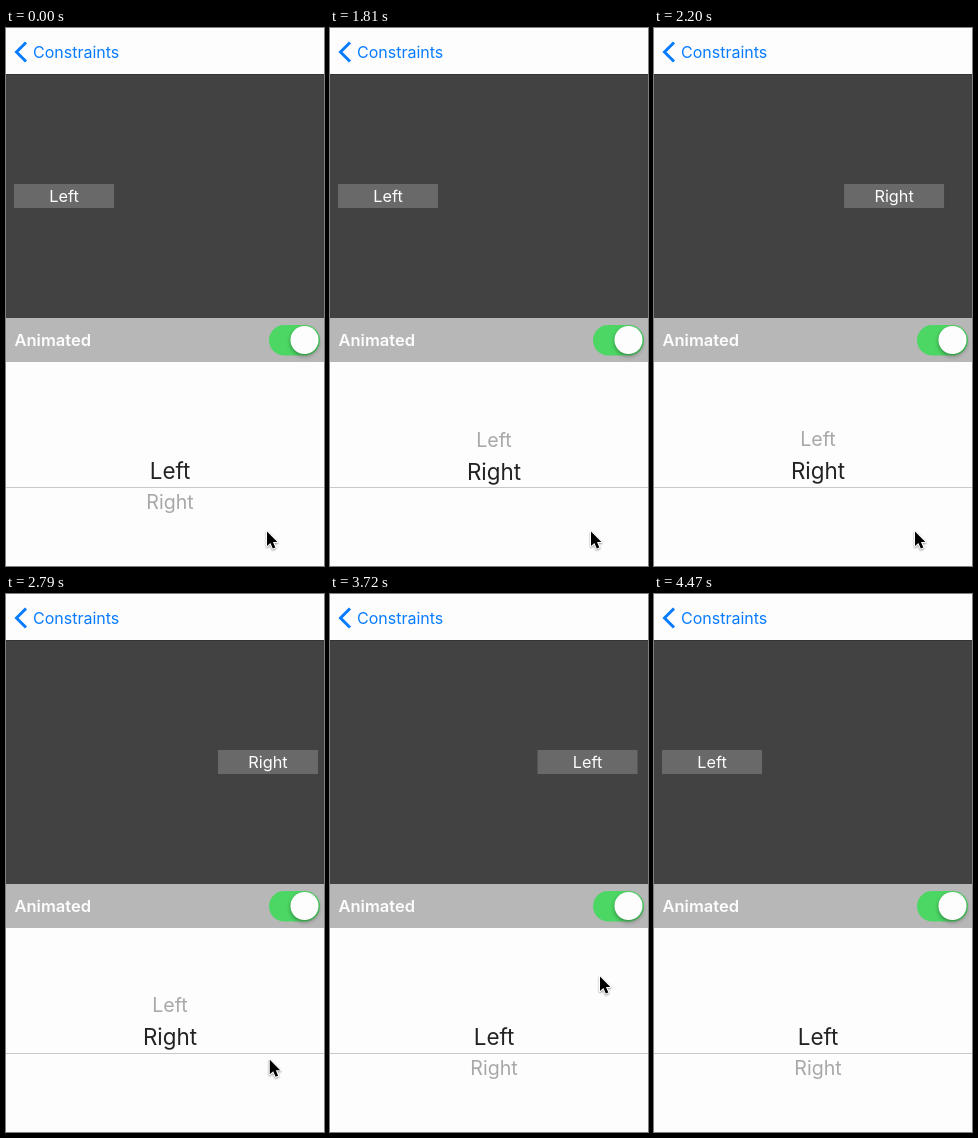
An HTML page with a canvas that plays this animation: 318 by 538 pixels, repeating every 5070 ms.

```html
<!DOCTYPE html>
<html lang="en">
<head>
<meta charset="utf-8">
<style>
html, body { margin: 0; width: 100%; height: 100%; overflow: hidden; background: #fdfdfd; }
canvas { display: block; width: 318px; height: 538px; }
</style>
</head>
<body>
<canvas></canvas>
<script>
const W = 318, H = 538, LOOP = 5070, STEP = 56;
const canvas = document.querySelector('canvas');
const ctx = canvas.getContext('2d');
const ratio = window.devicePixelRatio || 1;
canvas.width = W * ratio;
canvas.height = H * ratio;
ctx.scale(ratio, ratio);

// Each burst of motion: start time and number of steps after it
const BURSTS = [[0, 0], [1580, 13], [2730, 4], [3390, 13], [4246, 4]];
const ROWS = ['Left', 'Right'];

function snap(t) {
  const [start, count] = BURSTS.filter(b => b[0] <= t).pop();
  return start + STEP * Math.min(count, Math.floor((t - start) / STEP));
}

const mix = (a, b, k) => a + (b - a) * k;
const progress = (t, start, length) => Math.min(1, Math.max(0, (t - start) / length));

// cubic-bezier(.42, 0, .58, 1)
function easeInOut(x) {
  let lo = 0, hi = 1;
  for (let i = 0; i < 24; i++) {
    const s = (lo + hi) / 2, r = 1 - s;
    if (1.26 * r * r * s + 1.74 * r * s * s + s * s * s < x) lo = s; else hi = s;
  }
  return lo * lo * (3 - 2 * lo);
}

const ease = (t, start, length) => easeInOut(progress(t, start, length));

function rect(x, y, w, h, color) {
  ctx.fillStyle = color;
  ctx.fillRect(x, y, w, h);
}

function text(str, x, baseline, size, color, align = 'center', weight = 400) {
  ctx.font = `${weight} ${size}px Inter, sans-serif`;
  ctx.textAlign = align;
  ctx.fillStyle = color;
  ctx.fillText(str, x, baseline);
}

function clipped(y, h, draw) {
  ctx.save();
  ctx.beginPath();
  ctx.rect(0, y, W, h);
  ctx.clip();
  draw();
  ctx.restore();
}

function drawNav() {
  rect(0, 0, W, 46, '#fdfdfd');
  ctx.strokeStyle = '#087cff';
  ctx.lineWidth = 3;
  ctx.beginPath();
  ctx.moveTo(20, 14.5);
  ctx.lineTo(10.5, 24);
  ctx.lineTo(20, 33.5);
  ctx.stroke();
  text('Constraints', 27, 30, 16, '#087cff', 'left');
}

function drawSwitch() {
  ctx.fillStyle = '#4cd764';
  ctx.beginPath();
  ctx.roundRect(263, 297, 51, 30.5, 15.25);
  ctx.fill();
  ctx.save();
  ctx.shadowColor = 'rgba(0,0,0,.35)';
  ctx.shadowBlur = 4 * ratio;
  ctx.shadowOffsetY = 2 * ratio;
  ctx.fillStyle = '#fdfdfd';
  ctx.beginPath();
  ctx.arc(298.5, 312, 14, 0, Math.PI * 2);
  ctx.fill();
  ctx.restore();
}

function drawPicker(position) {
  const rows = (spacing, size, rise, color) => ROWS.forEach((name, i) =>
    text(name, 164, 442.5 + (i - position) * spacing + rise, size, color));
  const grey = () => rows(31.5, 19.6, 7.2, '#a8a8a8');
  clipped(334, 92, grey);
  clipped(460, 78, grey);
  clipped(426, 33, () => rows(34, 22.4, 8, '#232323'));
  rect(0, 459, W, 1, '#c9c9c9');
}

function drawCursor(x, y) {
  ctx.save();
  ctx.translate(x, y);
  ctx.beginPath();
  [[0, 0], [0, 14.5], [3.4, 11.4], [5.8, 17], [8.3, 15.9], [6, 10.5], [10.4, 10.4]]
    .forEach(p => ctx.lineTo(...p));
  ctx.closePath();
  ctx.lineJoin = 'round';
  ctx.lineWidth = 2;
  ctx.strokeStyle = '#fff';
  ctx.shadowColor = 'rgba(0,0,0,.4)';
  ctx.shadowBlur = 2 * ratio;
  ctx.shadowOffsetY = ratio;
  ctx.stroke();
  ctx.shadowColor = 'transparent';
  ctx.fillStyle = '#000';
  ctx.fill();
  ctx.restore();
}

function draw(time) {
  const t = snap(time);
  const picked = ease(t, 1543, 300) - ease(t, 3338, 285);
  const moved = ease(t, 1845, 455) - ease(t, 3622, 455);
  const name = ROWS[t >= 1845 && t < 3622 ? 1 : 0];
  const labelX = mix(8, 212, moved);

  rect(0, 0, W, H, '#fdfdfd');
  drawNav();
  rect(0, 46, W, 244, '#424242');
  rect(0, 46, W, 1, '#343434');
  rect(labelX, 156, 100, 24, '#696969');
  text(name, labelX + 50, 174, 16.3, '#fdfdfd');

  rect(0, 290, W, 44, '#b7b7b7');
  text('Animated', 8.5, 318, 16.5, '#fdfdfd', 'left', 600);
  drawSwitch();
  drawPicker(picked);

  const lift = ease(t, 2680, 274);
  const leave = progress(t, 4190, 280) ** 1.3;
  if (leave < 1) {
    drawCursor(mix(261, 270, lift) + 7 * leave, mix(503.5, 382.5, lift) + 157 * leave);
  }
}

function frame() {
  draw(performance.now() % LOOP);
  requestAnimationFrame(frame);
}
frame();
</script>
</body>
</html>
```
